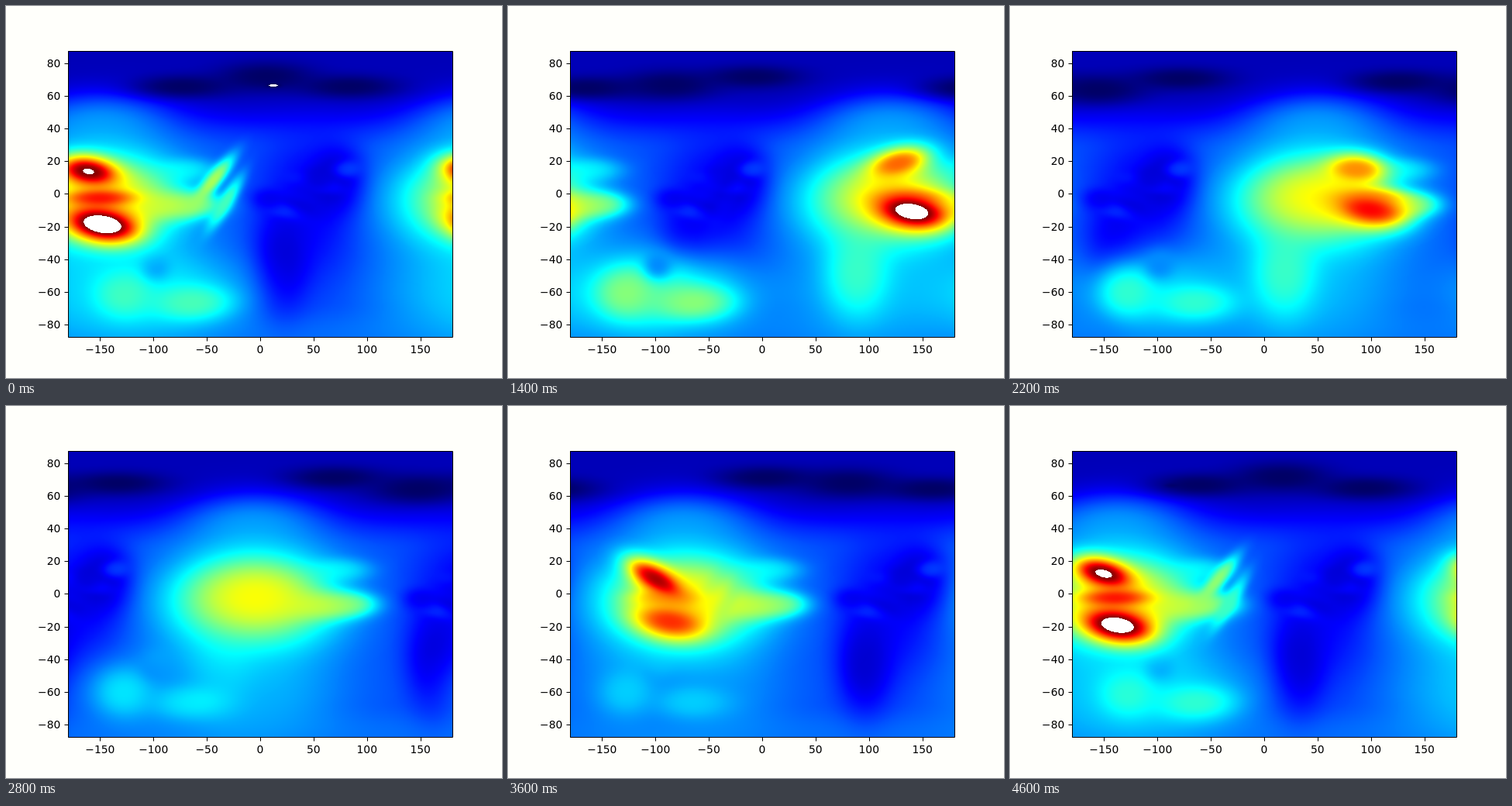
Animation of 640x480 px, one loop 4.8 s. Source, as an HTML page with a canvas:

```html
<!DOCTYPE html>
<html lang="en">
<head>
<meta charset="utf-8">
<title>Drifting heat map</title>
<style>
html, body { margin: 0; width: 100%; height: 100%; overflow: hidden; background: #fffffb; }
canvas { position: absolute; left: 80px; top: 58px; }
svg { position: absolute; left: 0; top: 0; }
text { font: 13.89px "DejaVu Sans", sans-serif; }
path { stroke: #000; fill: none; }
</style>
</head>
<body>
<canvas id="map" width="496" height="370"></canvas>
<svg id="axes" width="640" height="480"></svg>
<script>
const W = 496, H = 370, CELL = 2, STEPS = 24, STEP_MS = 200;
const GW = W / CELL + 1, GH = H / CELL + 1;
const PX_LON = 496 / 360, PX_LAT = 2.111;

const clamp = v => Math.max(0, Math.min(1, v));
const smooth = v => (v = clamp(v), v * v * (3 - 2 * v));

// Cosine over one loop, highest at the given step.
const wave = (step, peak) => Math.cos((step - peak) / STEPS * 2 * Math.PI);

// Bell over time, wrapping around the loop.
function pulse(step, peak, width) {
  let d = step - peak;
  d -= STEPS * Math.round(d / STEPS);
  return Math.exp(-((d / width) ** 2));
}

function seeded(seed) {
  return () => (seed = (seed * 16807) % 2147483647) / 2147483647;
}

// Blobs in painting order: centre and radii in degrees, level 0..1 on the colour scale.
function scene(step) {
  const blobs = [];
  const blob = (x, y, rx, ry, level, tilt = 0, strength = 1) => {
    const a = tilt * Math.PI / 180;
    blobs.push({ x, y, rx, ry, level, strength, c: Math.cos(a), s: Math.sin(a) });
  };
  const swing = wave(step, 6);
  const sun = -150 - 15 * step + 14 * swing;
  const night = sun + 180;

  // Broad day side
  blob(sun, 42, 68, 20, .26);
  blob(sun - 10, -62, 95, 34, .3);

  // Night side with faint ripples
  blob(night + 15, -8, 48, 46, .12);
  blob(night - 10, -42, 26, 30, .08);
  blob(night + 42, 8, 26, 20, .06);
  const rnd = seeded(7);
  for (let i = 0; i < 8; i++) {
    blob(night - 60 + 120 * rnd(), -25 + 50 * rnd(), 12 + 14 * rnd(), 4 + 3 * rnd(),
      i % 2 ? .08 : .2, -15 + 20 * rnd(), .7);
  }

  // Southern patches that stay in place
  const south = .42 + .1 * wave(step, 5);
  blob(-100, -60, 88, 27, south - .09);
  blob(-128, -60, 27, 15, south);
  blob(-65, -66, 38, 11, south);
  blob(-98, -43, 14, 9, .26);

  // Warm envelope and its eastern tail
  blob(sun, -7, 92, 40, .36);
  blob(sun - 30, -48, 30, 27, .46, 0, pulse(step, 9, 4));
  blob(sun + 80, 15, 30, 7, .34);
  blob(sun, -4, 73, 28, .47);
  blob(sun + 90, -6, 25, 7, .44);
  blob(sun + 62, -7, 40, 9, .54);
  blob(sun + 2, -2, 54, 20, .62);

  // Ridge lit at the end of the tail
  const ridge = pulse(step, 0, 4);
  blob(-45, 8, 24, 6, .32 + .22 * ridge, 37, ridge);
  blob(-33, -5, 22, 6, .32 + .12 * ridge, 45, ridge);

  // Hot cores drift more slowly, fade out in the east and rise again in the west
  const age = (step + 10) % STEPS;
  const core = -55 - 10.3 * age;
  const fade = smooth(age / 2) * smooth((STEPS - age) / 3);
  const hotCore = (x, y, rx, ry, heat, tilt) => {
    blob(x, y, rx, ry, .62 + .6 * (heat - .62), tilt, fade);
    blob(x, y, rx * .58, ry * .5, heat, tilt, fade);
  };
  blob(core + 8, -2, 30, 5, .68 + .18 * pulse(step, 23.5, 2), 0, fade);
  hotCore(core - 3, 14 + 5 * swing, 29, 10, .88 + .15 * wave(step, 22), 14 * swing - 5);
  hotCore(core + 10, -14 - 5 * wave(step, -2), 36, 12, .98 + .21 * wave(step, 3), -5);

  // Cold polar belt with a brief spot below the scale
  for (let k = -1; k <= 1; k++) {
    blob(sun + 155 + 78 * k, 68 + 4 * wave(step, 8 * k), 46, 9 - 2 * Math.abs(k), -.025);
  }
  blob(12 - 20 * step, 66.5, 6, 1.2, -.15, 0, pulse(step, 2, 2));
  return blobs;
}

function field(blobs) {
  const out = new Float32Array(GW * GH);
  for (let j = 0, n = 0; j < GH; j++) {
    const lat = (184.6 - j * CELL) / PX_LAT;
    const base = .055 + .145 * smooth((64 - lat) / 38) + .03 * smooth((-65 - lat) / 20);
    for (let i = 0; i < GW; i++) {
      const lon = i * CELL / PX_LON - 180;
      let v = base;
      for (const b of blobs) {
        let dx = lon - b.x;
        dx -= 360 * Math.round(dx / 360);
        const dy = lat - b.y;
        const p = (dx * b.c + dy * b.s) / b.rx, q = (dy * b.c - dx * b.s) / b.ry;
        const r = p * p + q * q;
        if (r < 4) v += (b.level - v) * b.strength * Math.exp(-Math.pow(r, 1.25));
      }
      out[n++] = v;
    }
  }
  return out;
}

// Values outside the scale are left white.
function jet(v) {
  if (v > 1 || v < -.04) return [255, 255, 255];
  return [3, 2, 1].map(k => 255 * clamp(1.5 - Math.abs(4 * v - k)));
}
const palette = Array.from({ length: 1601 }, (_, i) => jet(i / 1000 - .2));

function render(step) {
  const grid = field(scene(step));
  const image = new ImageData(W, H);
  for (let y = 0, n = 0; y < H; y++) {
    const j = Math.floor(y / CELL), fy = y / CELL - j;
    for (let x = 0; x < W; x++, n += 4) {
      const i = Math.floor(x / CELL), fx = x / CELL - i, g = j * GW + i;
      const top = grid[g] + (grid[g + 1] - grid[g]) * fx;
      const low = grid[g + GW] + (grid[g + GW + 1] - grid[g + GW]) * fx;
      const v = top + (low - top) * fy;
      image.data.set(palette[Math.round(clamp((v + .2) / 1.6) * 1600)], n);
      image.data[n + 3] = 255;
    }
  }
  return image;
}

function drawAxes() {
  let lines = "M80.5 58.5H576.5V427.5H80.5Z", labels = "";
  const label = (v, x, y, anchor) =>
    labels += `<text x="${x}" y="${y}" text-anchor="${anchor}">${String(v).replace("-", "\u2212")}</text>`;
  for (let v = -150; v <= 150; v += 50) {
    const x = 328 + v * PX_LON;
    lines += `M${Math.round(x) + .5} 427.5v5`;
    label(v, x, 448, "middle");
  }
  for (let v = -80; v <= 80; v += 20) {
    const y = Math.round(242.4 - v * PX_LAT);
    lines += `M80.5 ${y + .5}h-5`;
    label(v, 70.3, y + 5, "end");
  }
  document.getElementById("axes").innerHTML = `<path d="${lines}"/>${labels}`;
}

const ctx = document.getElementById("map").getContext("2d");
const cache = [];
let shown = -1;
const start = performance.now();

function tick() {
  const step = Math.floor((performance.now() - start) / STEP_MS) % STEPS;
  if (step !== shown) {
    ctx.putImageData(cache[step] ||= render(step), 0, 0);
    shown = step;
  }
  requestAnimationFrame(tick);
}

drawAxes();
tick();
</script>
</body>
</html>
```
